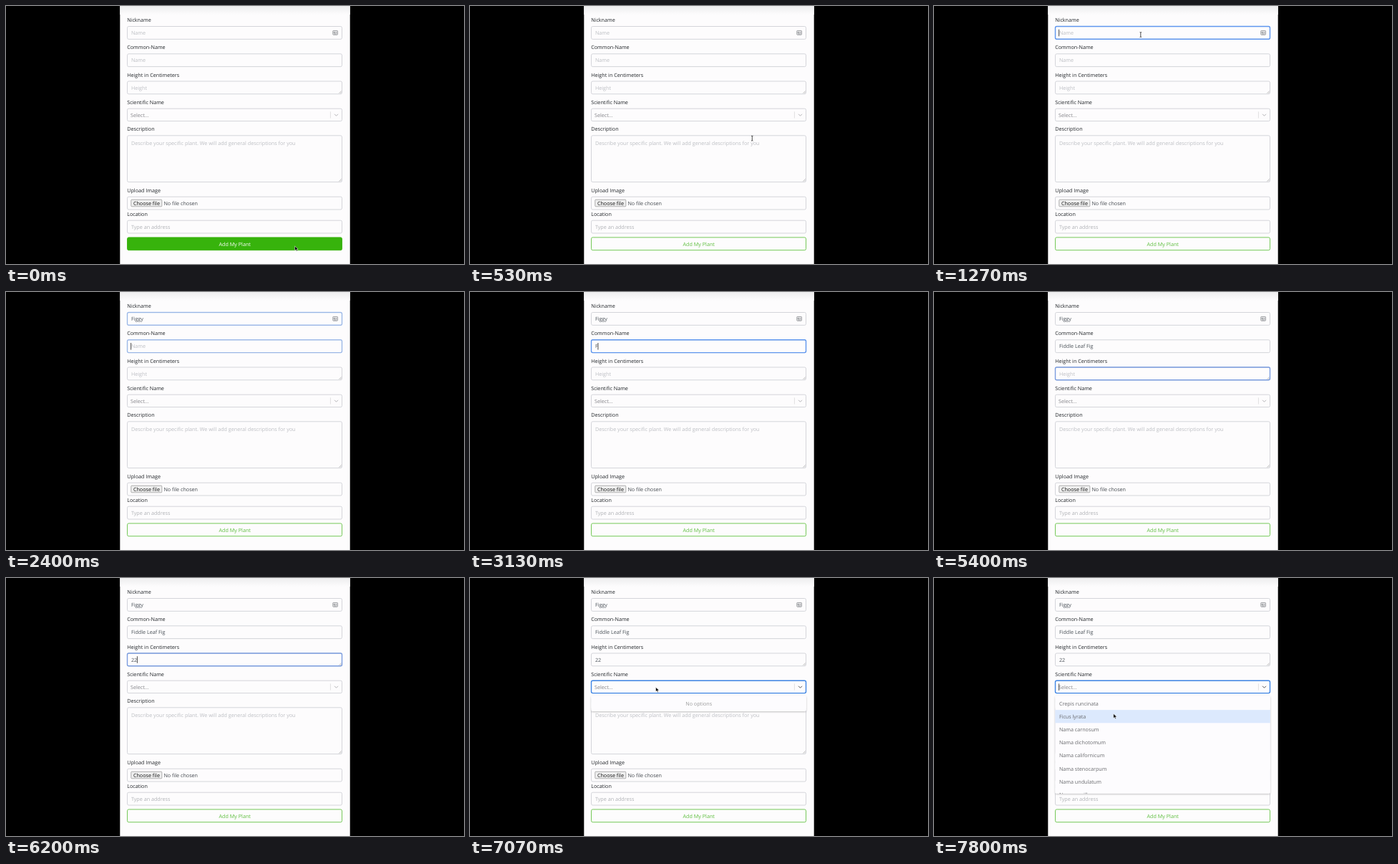
Animation of 640x360 px, one loop 8 s. Source, as an HTML page:

```html
<!DOCTYPE html>
<html lang="en">
<head>
<meta charset="utf-8">
<title>Plant form</title>
<style>
  html, body { margin: 0; width: 100%; height: 100%; overflow: hidden; background: #000; }
  svg { display: block; width: 640px; height: 360px; }
  text { font: 7.2px "Open Sans", "Noto Sans", sans-serif; white-space: pre; text-rendering: geometricPrecision; }
  .label { fill: #212529; }
  .value { fill: #495057; }
  .middle { text-anchor: middle; }
  .box { fill: none; stroke: #d0d1d6; stroke-width: .9; }
  .grip { stroke: #999; stroke-width: .6; }
</style>
</head>
<body>
<svg viewBox="0 0 640 360">
  <defs>
    <linearGradient id="shade" x2="0" y2="1">
      <stop stop-color="#ededee"/><stop offset="1" stop-color="#fdfcfd"/>
    </linearGradient>
    <filter id="shadow" x="-5%" y="-10%" width="110%" height="125%">
      <feDropShadow dx="0" dy="1" stdDeviation="1" flood-opacity=".25"/>
    </filter>
    <clipPath id="menuClip"><rect x="169" y="164" width="301" height="137"/></clipPath>
  </defs>
  <rect x="159.3" width="321.4" height="360" fill="#fdfcfd"/>
  <rect x="159.3" width="321.4" height="12" fill="url(#shade)"/>
  <g id="form"></g>

  <g fill="none" stroke="#85878b" stroke-width=".8">
    <rect x="456.8" y="34.4" width="6.6" height="5.8" rx=".6"/>
    <path d="M458 36.2h1.6v1.6h-1.6zM460.6 36.2h1.8M460.6 37.6h1.8M458 39h4.4"/>
  </g>
  <path d="M453.4 147.5v9" stroke="#ccc" stroke-width=".6"/>
  <path id="chevron" d="M459 150.8l2.5 2.5 2.5-2.5" fill="none" stroke-width="1"/>
  <rect x="174.8" y="270.2" width="43" height="9.6" rx="1" fill="#efefef" stroke="#808080" stroke-width=".6"/>
  <text x="177.9" y="277.6" fill="#111">Choose file</text>
  <text x="220.4" y="277.6" fill="#43484e">No file chosen</text>
  <rect id="button" x="169.5" y="322.9" width="300" height="17.8" rx="2" fill="#37b30c" stroke="#66c346" stroke-width=".9"/>
  <text id="buttonText" class="middle" x="319.7" y="334.5">Add My Plant</text>

  <g id="menu">
    <rect id="panel" x="169.3" y="164.2" width="300.6" rx="2" fill="#fdfcfe" filter="url(#shadow)"/>
    <text id="empty" class="middle" x="319.7" y="177.7" fill="#999">No options</text>
    <g id="options" clip-path="url(#menuClip)">
      <rect id="hover" x="169.3" width="300.6" height="18.2" fill="#dce9fd"/>
    </g>
  </g>
  <path id="caret" stroke="#222" stroke-width=".8"/>
  <path id="arrow" d="M0 0v6.2l1.5-1.3 1 2.2 1.1-.5-1-2.1 2-.1z" fill="#000" stroke="#fff" stroke-width=".5"/>
  <path id="beam" d="M-1.2-3.5Q0-3.5 0-2.6 0-3.5 1.2-3.5M0-2.6V2.6M-1.2 3.5Q0 3.5 0 2.6 0 3.5 1.2 3.5" fill="none" stroke="#222" stroke-width=".8"/>
</svg>
<script>
const LOOP = 8000;
const $ = id => document.getElementById(id);
const clamp = v => Math.max(0, Math.min(1, v));

function add(parent, tag, attrs, text = '') {
  const el = document.createElementNS('http://www.w3.org/2000/svg', tag);
  for (const key in attrs) el.setAttribute(key, attrs[key]);
  el.textContent = text;
  return parent.appendChild(el);
}

const show = (el, on) => el.setAttribute('visibility', on ? 'visible' : 'hidden');
const set = (el, key, value) => el.setAttribute(key, value);

const commonTimes = [3130, ...Array.from({ length: 10 }, (_, i) => 3270 + 73 * i), 4130, 4330, 4470, 4530];
const fields = [
  { label: 'Nickname', y: 28.5, h: 17.8, hint: 'Name', value: 'Figgy', times: [1730, 1870, 1930, 2000, 2070], focus: [1000, 2330], ring: '#5e96ee' },
  { label: 'Common-Name', y: 66.8, h: 17.8, hint: 'Name', value: 'Fiddle Leaf Fig', times: commonTimes, focus: [2330, 4800], ring: '#5e96ee' },
  { label: 'Height in Centimeters', y: 105, h: 17.8, hint: 'Height', grip: true, value: '22', times: [5930, 6070], focus: [4800, 6730], ring: '#7b9ddf' },
  { label: 'Scientific Name', y: 143.2, h: 17.4, hint: 'Select...', hintX: 174, hintColor: '#85858a', plain: true, focus: [6730, 9000], ring: '#3f86e6' },
  { label: 'Description', y: 180.8, h: 64.8, hint: 'Describe your specific plant. We will add general descriptions for you', grip: true },
  { label: 'Upload Image', y: 266.2, h: 17.8, plain: true },
  { label: 'Location', y: 299.2, h: 17.8, hint: 'Type an address', hintColor: '#b0b2b6' }
];

for (const f of fields) {
  const form = $('form');
  const box = { x: 169.5, y: f.y, width: 300, height: f.h, rx: 2 };
  const textY = f.y + (f.h > 20 ? 13.2 : 11.6);
  add(form, 'text', { class: 'label', x: 169.2, y: f.y - 6.4 }, f.label);
  add(form, 'rect', { class: 'box', ...box });
  if (f.grip) {
    const bottom = f.y + f.h - 1;
    add(form, 'path', { class: 'grip', d: `M465.4 ${bottom}l3.3-3.3M467.2 ${bottom}l1.5-1.5` });
  }
  f.hintText = add(form, 'text', { x: f.hintX || 174.9, y: textY, fill: f.hintColor || '#bcbec3' }, f.hint);
  if (f.focus) f.outline = add(form, 'rect', { ...box, fill: 'none', stroke: f.ring, 'stroke-width': 1.4 });
  if (f.value) f.valueText = add(form, 'text', { class: 'value', x: 174.9, y: textY });
}

const names = ['Crepis runcinata', 'Ficus lyrata', 'Nama carnosum', 'Nama dichotomum',
  'Nama californicum', 'Nama stenocarpum', 'Nama undulatum', 'Nama pusillum'];
const rowY = i => 165.9 + 18.22 * i;
names.forEach((name, i) => add($('options'), 'text', { x: 174.9, y: rowY(i) + 11.7, fill: '#696a6d' }, name));

// Pointer path: time, x, y
const path = [
  [0, 403.6, 335], [60, 403.6, 335], [200, 469, 300], [330, 456.5, 270], [420, 456.5, 270],
  [730, 288.8, 40], [6440, 288.8, 40], [6441, 281, 112], [6730, 259.6, 152.4],
  [7480, 259.6, 152.4], [7780, 250.8, 189.4], [LOOP, 250.8, 189.4]
];

function pointerAt(t) {
  const i = path.findIndex(p => p[0] > t);
  const [a, b] = [path[i - 1], path[i]];
  const k = (t - a[0]) / (b[0] - a[0]);
  return [a[1] + (b[1] - a[1]) * k, a[2] + (b[2] - a[2]) * k];
}

function drawFields(t) {
  let caret = '';
  for (const f of fields.filter(f => f.focus)) {
    const [start, end] = f.focus;
    set(f.outline, 'opacity', clamp((t - start) / 150) * clamp(1 - (t - end) / 150));
    let x = 174.6, since = start;
    if (f.value) {
      const count = f.times.filter(time => time <= t).length;
      f.valueText.textContent = f.value.slice(0, count);
      show(f.hintText, !count);
      if (count) {
        x = 175.2 + f.valueText.getComputedTextLength();
        since = f.times[count - 1];
      }
    }
    const lit = f.value ? (t - since) % 1060 < 530 : t >= 7325;
    if (t >= start && t < end && lit) caret = `M${x} ${f.y + 4.2}v9.6`;
  }
  set($('caret'), 'd', caret);
}

function drawMenu(t, pointerY) {
  const loaded = t >= 7325;
  show($('menu'), t >= 6860);
  $('empty').style.display = loaded ? 'none' : '';
  $('options').style.display = loaded ? '' : 'none';
  set($('panel'), 'height', loaded ? 136.6 : 21.8);
  set($('hover'), 'y', rowY(pointerY > rowY(1) ? 1 : 0));
  set($('chevron'), 'stroke', t >= 6730 ? '#555' : '#b4b4b8');
}

function draw(now) {
  const t = (now + 4) % LOOP;
  const [x, y] = pointerAt(t);
  drawFields(t);
  drawMenu(t, y);

  const hover = clamp(1 - (t - 100) / 150);
  const mix = (a, b) => a + (b - a) * hover;
  set($('button'), 'fill-opacity', hover);
  set($('button'), 'stroke', `rgb(${mix(102, 55)},${mix(195, 179)},${mix(70, 12)})`);
  set($('buttonText'), 'fill', `rgb(${mix(92, 255)},${mix(190, 255)},${mix(60, 255)})`);

  const visible = t < 1725 || t >= 6441;
  const overText = fields.some(f => !f.plain && x < 470 && y > f.y && y < f.y + f.h) && t < 6800;
  show($('arrow'), visible && !overText);
  show($('beam'), visible && overText);
  for (const id of ['arrow', 'beam']) set($(id), 'transform', `translate(${x} ${y})`);
}

const begin = performance.now();
function tick() {
  draw(performance.now() - begin);
  requestAnimationFrame(tick);
}
tick();
</script>
</body>
</html>
```
